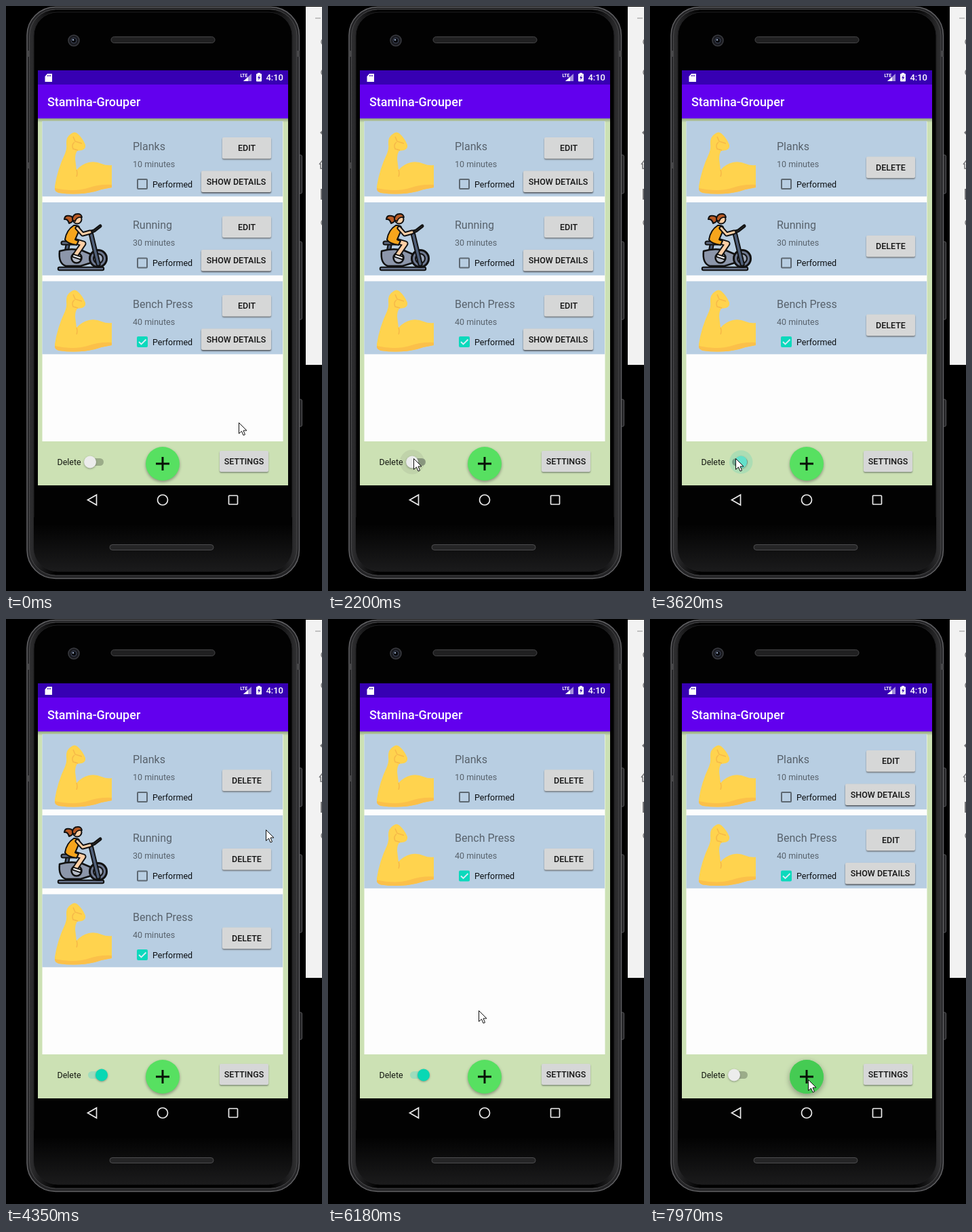
Write an HTML page with a canvas that moves like this. It is 466x864 px and loops after 8000 ms.

```html
<!DOCTYPE html>
<html lang="en">
<head>
<meta charset="utf-8">
<title>Exercise list</title>
<style>
html, body { margin: 0; width: 100%; height: 100%; overflow: hidden; background: #000; }
canvas { display: block; }
</style>
</head>
<body>
<canvas id="stage" width="466" height="864"></canvas>
<script>
const ctx = document.getElementById('stage').getContext('2d');
const LOOP = 8000, PITCH = 116.5, SLIDE = 250;
const WINDOW = '#cce1b4', CARD = '#b8cee2', BUTTON = '#d6d7d7';
const TEAL = [8, 216, 180], PALE = [236, 236, 236];

const toggles = [
  { press: 2080, at: 2190, list: 2225, on: 1 },
  { press: 2950, at: 3040, list: 3045, on: 0 },
  { press: 3390, at: 3480, list: 3510, on: 1 },
  { press: 6850, at: 6935, list: 6950, on: 0 }
];
const REMOVE_PRESS = 5130, REMOVED = 5250;

// Pointer stops: time, x, y
const pointer = [
  [0, 343, 615], [570, 343, 615], [740, 350, 540], [960, 306, 463], [1350, 228, 592],
  [1650, 140, 660], [1870, 126, 668], [4050, 126, 668], [4350, 382, 312],
  [4580, 418, 275], [4850, 404, 257], [5100, 374, 344], [5700, 374, 344], [6080, 250, 535],
  [6470, 149, 682], [6540, 140, 671], [7250, 140, 671], [7640, 371, 387], [7870, 233, 680],
  [LOOP, 233, 680]
];

const clamp = v => Math.max(0, Math.min(1, v));
const ease = v => (1 - Math.cos(Math.PI * clamp(v))) / 2;
const mix = (a, b, k) => a + (b - a) * k;
const rgb = c => `rgb(${c.map(Math.round).join()})`;

function box(x, y, w, h, r, fill, stroke, line = 1) {
  ctx.beginPath();
  ctx.roundRect(x, y, w, h, r);
  paint(fill, stroke, line);
}
function disc(x, y, r, fill, stroke, line = 1) {
  ctx.beginPath();
  ctx.arc(x, y, r, 0, Math.PI * 2);
  paint(fill, stroke, line);
}
function shape(d, fill, stroke, line = 1) {
  const path = new Path2D(d);
  if (fill) { ctx.fillStyle = fill; ctx.fill(path); }
  if (stroke) { ctx.strokeStyle = stroke; ctx.lineWidth = line; ctx.stroke(path); }
}
function paint(fill, stroke, line) {
  if (fill) { ctx.fillStyle = fill; ctx.fill(); }
  if (stroke) { ctx.strokeStyle = stroke; ctx.lineWidth = line; ctx.stroke(); }
}
function text(s, x, y, size, color, weight = 400, align = 'left') {
  ctx.font = `${weight} ${size}px Roboto, sans-serif`;
  ctx.textAlign = align;
  ctx.fillStyle = color;
  ctx.fillText(s, x, y);
}
function ramp(x0, y0, x1, y1, ...colors) {
  const g = ctx.createLinearGradient(x0, y0, x1, y1);
  colors.forEach((c, i) => g.addColorStop(i / (colors.length - 1), c));
  return g;
}
function shadow(color, blur, dy) {
  ctx.shadowColor = color;
  ctx.shadowBlur = blur;
  ctx.shadowOffsetY = dy;
}

function sidePanel() {
  ctx.fillStyle = '#f2f2f2';
  ctx.fillRect(442, 1, 24, 529);
  const ink = '#77777a';
  shape('M456 18H464', null, '#b0b0b0', 1.5);
  for (const y of [53, 98, 320]) disc(470, y, 5, null, ink, 1.5);
  shape('M463 187L468 182V192Z', ink);
  shape('M462 234L468 226M464 233V240H468', null, ink, 1.5);
  box(465, 271, 8, 14, 0, null, ink, 2);
}

function phone() {
  for (const [y, h] of [[220, 57], [348, 115], [581, 40]])
    box(431, y, 5.5, h, 2, '#242426', '#57575a');
  box(31, 1.5, 401.5, 844, 42, '#242426', '#626265', 1.5);
  box(34.5, 5, 394.5, 836, 39, ramp(34, 0, 429, 0, '#303032', '#000', '#000', '#000',
    '#000', '#000', '#000', '#000', '#000', '#000', '#303032'), '#48484a');
  box(41, 9, 381, 826, 35, '#020202', '#202022');
  box(41, 755, 381, 80, [0, 0, 35, 35], ramp(0, 765, 0, 835, '#020202', '#1b1b1c'));
  ctx.fillStyle = '#48484a';
  for (const y of [66, 231]) ctx.fillRect(30, y, 4, 9);
  ctx.fillRect(429, 66, 4, 9);
  box(155, 45.5, 153, 9, 4.5, '#202021', '#464648');
  box(153, 795.5, 153, 8, 4, '#252526', '#4b4b4d');
  disc(100, 51, 8, '#1a1b20', '#3a3b40', 1.5);
  disc(100, 51, 4, '#07080c', '#40485a');
  disc(99, 50, 1.3, '#95a5c0');
}

function bars() {
  ctx.fillStyle = WINDOW;
  ctx.fillRect(47, 95, 369, 613);
  ctx.fillStyle = '#3700b3';
  ctx.fillRect(47, 95, 369, 21);
  ctx.fillStyle = '#6200ee';
  ctx.fillRect(47, 116, 369, 50);
  shape('M61 100H68V112H57.5V104Z', '#fff');
  shape('M61.5 102V104M63.5 102V104M65.5 102V104', null, '#3700b3');
  shape('M362 100V111H350Z', '#a48fdc');
  shape('M357 105V111H350Z', '#fff');
  text('LTE', 345.5, 105, 6.5, '#fff', 700);
  box(369, 100, 8, 11.5, 1, '#fff');
  ctx.fillRect(371, 98.8, 4, 2);
  shape('M374 101.5L371 106.5H373L372 110L375.3 105H373.2Z', '#3700b3');
  text('4:10', 409, 110, 13, '#fff', 500, 'right');
  text('Stamina-Grouper', 61, 148, 18, '#fff', 500);
  ctx.fillStyle = '#fdfdfd';
  ctx.fillRect(53.5, 170, 355, 473);
  ctx.fillStyle = ramp(0, 166, 0, 172, '#50605080', '#50605000');
  ctx.fillRect(47, 166, 369, 6);

  const nav = '#ececec';
  shape('M133.5 722V737L120.5 729.5Z', null, nav, 1.7);
  disc(231, 729.5, 7.5, null, nav, 1.7);
  box(328.5, 723, 13, 13, 1, null, nav, 1.7);
}

function button(label, x, y, w, h, pressed = 0, edge = '#70757a') {
  ctx.save();
  shadow(edge, 2, 1.5);
  box(x, y, w, h, 2, BUTTON);
  ctx.restore();
  if (pressed) box(x, y, w, h, 2, `rgba(80,80,80,${pressed * 0.25})`);
  text(label, x + w / 2, y + h / 2 + 4.5, 12.5, '#141414', 500, 'center');
}

function arm() {
  shape('M97 188Q101 185 105 188Q113 195 117 205Q118 211 112 213L105 214Q102 218 102 226' +
    'L104 242Q111 234 122 231Q132 229 141 233Q148 236 156 235V268Q143 270 131 274Q106 280 78 276' +
    'Q71 274 72 266Q76 241 87 218Q90 210 89 204Q88 193 97 188Z', '#ffd34e');
  shape('M72 269Q100 275 120 269Q137 263 156 264V268Q143 270 131 274Q106 280 78 276Q71 274 72 269Z', '#fbc04a');
  const fold = '#f6b848';
  shape('M104 242Q106 247 104 252M99 193L102 200L112 203M101 201Q96 205 99 211L106 213', null, fold, 1.5);
}

function limb(d, width, color) {
  shape(d, null, '#111', width + 4);
  shape(d, null, color, width);
}

function cyclist() {
  const skin = '#ffcfa5', hair = '#b95a24', frame = '#50607a';
  ctx.save();
  ctx.translate(0, -PITCH);
  ctx.lineCap = ctx.lineJoin = 'round';
  limb('M79 388H142', 2.5, '#68748c');
  limb('M91 353L89 364', 3, frame);
  shape('M79 362Q95 357 112 361L126 367V379L110 384H88Q77 380 79 362Z', '#8c96aa', '#111', 2.5);
  disc(136, 373, 12.5, '#6d7890', '#111', 3);
  disc(136, 373, 7, '#9aa5b8', '#111', 2);
  disc(136, 373, 2, '#111');
  limb('M125 335L136 381', 3.5, frame);
  limb('M84 350H100', 3, '#5f6a80');
  limb('M119 335L130 332L139 325', 1, '#333');
  disc(104, 372, 7.5, '#b4bac6', '#111', 2.5);
  shape('M97 311Q87 307 86 315Q91 314 93 321Q99 319 99 315Z', hair, '#111', 2);
  disc(105, 315, 6.5, skin, '#111', 2);
  shape('M98 316Q98 307 106 307Q111 307 112 312Q104 311 102 318Z', hair, '#111', 1.8);
  limb('M94 345L114 351L103 367', 5, skin);
  limb('M100 369L109 372', 2, '#f4f4f4');
  shape('M100 324Q110 323 108 331L102 345L107 347L104 353Q90 351 87 345Q89 331 100 324Z', '#f6a51c', '#111', 2);
  limb('M105 328L113 337L124 334', 3, skin);
  ctx.restore();
}

const rows = [
  { name: 'Planks', time: '10 minutes', icon: arm },
  { name: 'Running', time: '30 minutes', icon: cyclist },
  { name: 'Bench Press', time: '40 minutes', icon: arm, done: true }
];

function row(item, index, deleting, pressed) {
  ctx.save();
  ctx.translate(0, index * PITCH);
  const top = index ? 173.5 : 170;
  ctx.fillStyle = CARD;
  ctx.fillRect(53.5, top, 354.5, 281.3 - top);
  item.icon();
  text(item.name, 187, 212.5, 16, '#58626c');
  text(item.time, 187, 237.5, 12.5, '#58626c');
  text('Performed', 216, 267.5, 12.5, '#0c0f12');
  if (item.done) {
    box(193, 255, 16, 16, 2, '#0cd9bc');
    shape('M196 263L199.5 266.5L206.5 259.5', null, '#dcecf6', 1.8);
  } else {
    box(194, 256, 14, 14, 1, null, '#5d6872', 2);
  }
  if (deleting) {
    button('DELETE', 319, 222.5, 72, 31.5, pressed);
  } else {
    button('EDIT', 319, 194, 72, 31.5);
    button('SHOW DETAILS', 288, 243.5, 103, 31.5, 0, '#484b50');
  }
  ctx.restore();
}

function switchState(t) {
  const past = toggles.filter(e => t >= e.at);
  const last = past[past.length - 1];
  if (!last) return { pos: 0, moving: false };
  const k = ease((t - last.at) / SLIDE);
  return { pos: last.on ? k : 1 - k, moving: k < 1 };
}

function footer(t) {
  text('Delete', 75.5, 678, 12.5, '#151812');
  const { pos, moving } = switchState(t);
  const x = mix(124, 141, pos);
  let glow = 0;
  for (const e of toggles)
    if (t >= e.press) glow = Math.max(glow, Math.min(clamp((t - e.press) / 90), clamp((e.at + 420 - t) / 320)));
  const track = moving ? '#8b9a80' : pos ? '#9fdcbc' : '#9bac89';
  box(121, 668, 23, 11, 5.5, track);
  if (glow) disc(x, 673.5, 12 + 6 * glow, pos > 0.5
    ? `rgba(20,200,180,${glow * 0.2})` : `rgba(120,130,115,${glow * 0.15})`);
  ctx.save();
  shadow('#4a504888', 3, 1);
  disc(x, 673.5, 9, rgb(PALE.map((c, i) => mix(c, TEAL[i], pos))));
  ctx.restore();

  const held = clamp((t - 7870) / 90);
  ctx.save();
  shadow('#606a58aa', 4 + 4 * held, 2 + held);
  disc(231, 676, 25, '#57e061');
  ctx.restore();
  if (held) disc(231, 676, 25 * held, '#45cb53');
  ctx.fillStyle = '#081207';
  ctx.fillRect(221, 674.5, 20, 3);
  ctx.fillRect(229.5, 666, 3, 20);
  button('SETTINGS', 315, 657, 72, 31, 0, '#7c8a74');
}

// Speed along one axis at a stop; zero wherever the pointer rests
function speed(i, axis) {
  const a = pointer[i - 1], b = pointer[i], c = pointer[i + 1];
  const rests = (p, q) => p[1] === q[1] && p[2] === q[2];
  if (!a || !c || rests(a, b) || rests(b, c)) return 0;
  return (c[axis] - a[axis]) / (c[0] - a[0]);
}

function pointerAt(t, axis) {
  const i = pointer.findIndex(p => p[0] > t);
  const a = pointer[i - 1], b = pointer[i], span = b[0] - a[0];
  const k = (t - a[0]) / span, j = 1 - k;
  return mix(a[axis], b[axis], k * k * (3 - 2 * k))
    + span * k * j * (j * speed(i - 1, axis) - k * speed(i, axis));
}

function cursor(t) {
  ctx.save();
  ctx.translate(Math.round(pointerAt(t, 1)) + 0.5, Math.round(pointerAt(t, 2)) + 0.5);
  shape('M0 0V16L4 12.5L6.5 18.5L9 17.5L6.5 11.5H11.5Z', '#fff', '#111', 1);
  ctx.restore();
}

function draw(t) {
  ctx.fillStyle = '#000';
  ctx.fillRect(0, 0, 466, 864);
  sidePanel();
  phone();
  bars();
  const deleting = toggles.reduce((on, e) => t >= e.list ? e.on : on, 0);
  const pressed = t < REMOVED ? clamp((t - REMOVE_PRESS) / 100) : 0;
  rows.filter((_, i) => i !== 1 || t < REMOVED)
    .forEach((item, i) => row(item, i, deleting, i === 1 ? pressed : 0));
  footer(t);
  cursor(t);
}

const start = performance.now();
function tick() {
  draw((performance.now() - start) % LOOP);
  requestAnimationFrame(tick);
}
tick();
</script>
</body>
</html>
```
